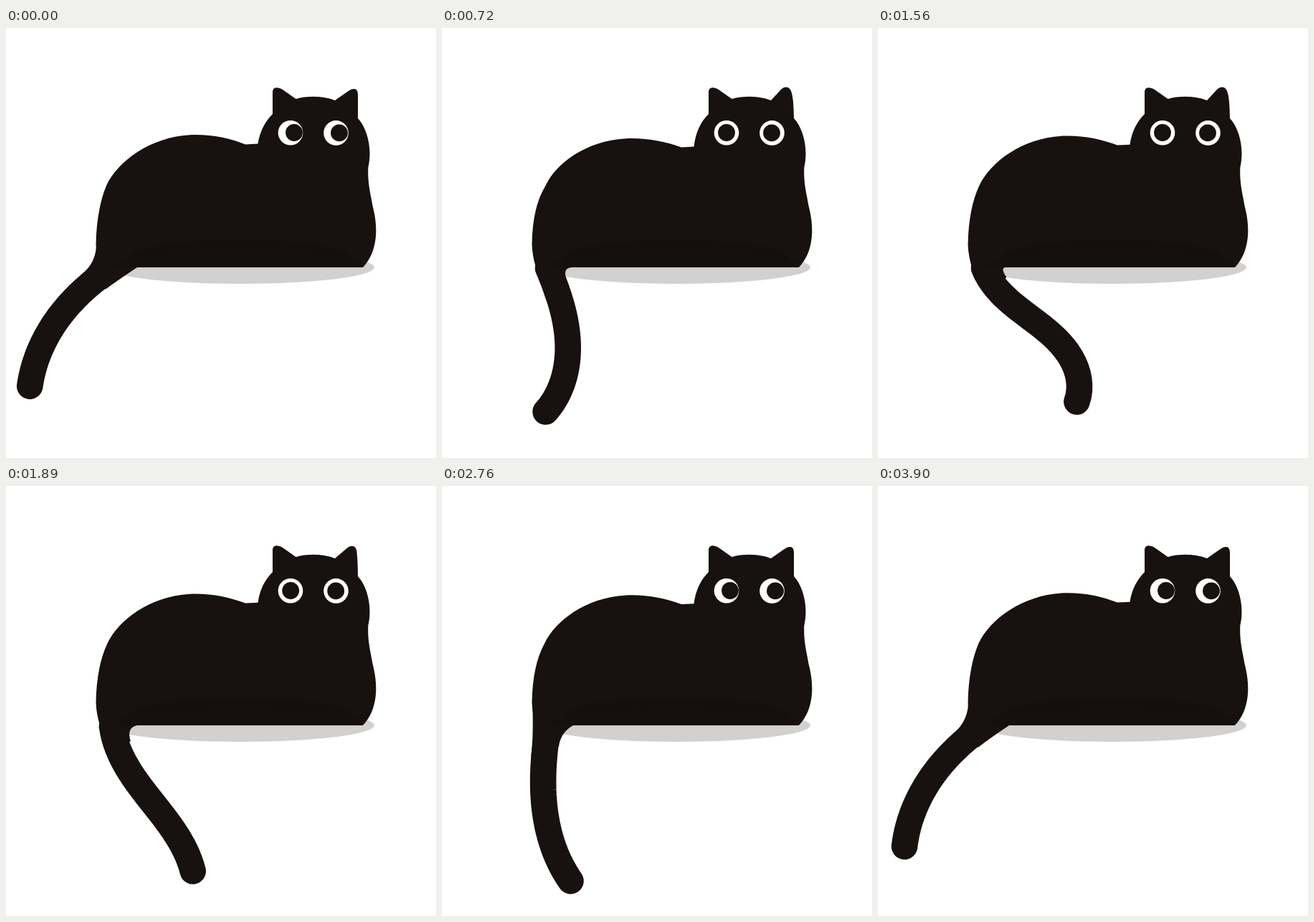
Animation of 600x600 px, one loop 3930 ms. Source, as an HTML page:

```html
<!DOCTYPE html>
<html lang="en">
<head>
<meta charset="utf-8">
<title>Cat</title>
<style>
  html, body { margin: 0; width: 100%; height: 100%; overflow: hidden; background: #fff; }
  svg { display: block; width: 100%; height: 100%; }
  .fur { fill: #17110f; }
  #tail { fill: none; stroke: #17110f; stroke-width: 36.6; stroke-linecap: round; stroke-linejoin: round; }
</style>
</head>
<body>
<svg viewBox="0 0 600 600">
  <defs>
    <clipPath id="inside"><rect x="140" y="280" width="358" height="54"/></clipPath>
  </defs>
  <ellipse cx="327" cy="334" rx="187" ry="23" fill="#d3d1d0"/>
  <path id="tail"/>
  <path id="root" class="fur"/>
  <path id="body" class="fur"/>
  <g clip-path="url(#inside)">
    <ellipse cx="327" cy="320" rx="155" ry="25" fill="#140e0c"/>
    <ellipse cx="327" cy="334" rx="180" ry="22" fill="#150f0d"/>
  </g>
  <g fill="#fff">
    <circle cx="397" cy="146.2" r="17.3"/>
    <circle cx="460.5" cy="146.4" r="17.3"/>
  </g>
  <g id="pupils" class="fur">
    <circle cx="397" cy="146" r="11.9"/>
    <circle cx="460" cy="146.4" r="11.9"/>
  </g>
</svg>
<script>
const LOOP = 3930, STEP = 30, LINKS = 30, HALF = 18.3;
const base = [148, 335];

// time, headings at root, middle and tip (degrees from straight down), length
const swing = [
  [0, -57, -36, -8, 207],
  [720, 23, 3, -42, 212],
  [1560, 22, 51, -20, 240],
  [2220, -7, 20, 43, 226],
  [2760, -9, 6, 35, 224],
  [3300, -30, -6, 18, 220],
  [LOOP, -57, -36, -8, 207]
];

const $ = id => document.getElementById(id);
const mix = (a, b, u) => a + (b - a) * u;
const rise = (t, from, to) => Math.min(1, Math.max(0, (t - from) / (to - from)));

// Slope at a pose; one-sided at both ends so the turn there stays sharp.
function slope(i, k) {
  const rate = j => (swing[j + 1][k] - swing[j][k]) / (swing[j + 1][0] - swing[j][0]);
  if (i === 0) return rate(0);
  if (i === swing.length - 1) return rate(i - 1);
  const before = swing[i][0] - swing[i - 1][0], after = swing[i + 1][0] - swing[i][0];
  return (rate(i - 1) * after + rate(i) * before) / (before + after);
}

function swingAt(t) {
  const i = swing.findIndex((_, j) => t < swing[j + 1][0]);
  const a = swing[i], b = swing[i + 1], h = b[0] - a[0], u = (t - a[0]) / h, v = 1 - u;
  return a.map((n, k) =>
    n * v * v * (1 + 2 * u) + b[k] * u * u * (3 - 2 * u) +
    h * u * v * (slope(i, k) * v - slope(i + 1, k) * u));
}

// The heading varies as a quadratic along the tail; short links follow it.
function tailPoints(t) {
  const [, root, middle, tip, length] = swingAt(t);
  const link = length / LINKS, pts = [base];
  for (let i = 0; i < LINKS; i++) {
    const s = (i + 0.5) / LINKS;
    const deg = root * (1 - s) * (1 - 2 * s) + middle * 4 * s * (1 - s) + tip * s * (2 * s - 1);
    const a = deg * Math.PI / 180, [x, y] = pts[i];
    pts.push([x + link * Math.sin(a), y + link * Math.cos(a)]);
  }
  return pts;
}

// Soft corners where the tail leaves the body.
function rootPath(p) {
  const dx = p[0] - base[0], dy = p[1] - base[1], len = Math.hypot(dx, dy);
  const dir = [dx / len, dy / len], side = [dir[1] * HALF, -dir[0] * HALF];
  const mid = base.map((n, k) => mix(n, p[k], 0.6));
  const right = mid.map((n, k) => n + side[k]);
  const left = p.map((n, k) => n - side[k]);
  const back = (q, d) => q.map((n, k) => n - dir[k] * d);
  return `M126 296Q${back(left, 30)} ${left}L${p}L${mid}L${right}Q${back(right, 20)} 183 334L184 296Z`;
}

function bodyPath(sink, ear) {
  const e = (a, b) => mix(a, b, ear);
  const top = 149 + sink, neck = 162.4 + sink * 0.8;
  return `M125.5 302C126 270 131 242 ${140 + sink * 0.9} 220` +
    `C${157 + sink * 0.6} ${184 + sink * 0.6} 206 ${top} 265 ${top}` +
    `C290 ${top} 313 ${top + 5} 334 ${neck}` +
    `L351.5 ${neck - 0.8}C354 145 361 131 372 120L372 90` +
    `C372 82 379 82 386 86L404.5 99C420 94.5 442 94.5 459 101` +
    `L${e(477, 471)} ${e(88.5, 88)}C${e(485, 478)} ${e(83, 79.5)} ${e(491, 486)} ${e(84, 81)} ${e(491, 488)} ${e(93, 91)}` +
    `Q${e(491, 490.5)} ${e(108, 99)} 491 126C504 140 511.5 168 505.3 195` +
    `C504.5 217 508.5 230 511.5 248C519 276 520 311 498 334L131 334Q126 318 125.5 302Z`;
}

function draw(now) {
  const t = Math.floor((now % LOOP) / STEP) * STEP;
  const sink = 5 * rise(t, 0, 720) - 4 * rise(t, 720, 1650) +
    3.4 * rise(t, 1650, 3300) - 4.4 * rise(t, 3300, LOOP);
  const ear = rise(t, 0, 540) - rise(t, 1620, 2160);
  const gaze = 1 - rise(t, 0, 570) + rise(t, 1860, 2580);
  const pts = tailPoints(t);
  $("tail").setAttribute("d", "M" + pts.join("L"));
  $("root").setAttribute("d", rootPath(pts[LINKS / 5]));
  $("body").setAttribute("d", bodyPath(sink, ear));
  $("pupils").setAttribute("transform", `translate(${5 * gaze} 0)`);
}

let start;
function tick(now) {
  start ??= now;
  draw(now - start);
  requestAnimationFrame(tick);
}
draw(0);
requestAnimationFrame(tick);
</script>
</body>
</html>
```
